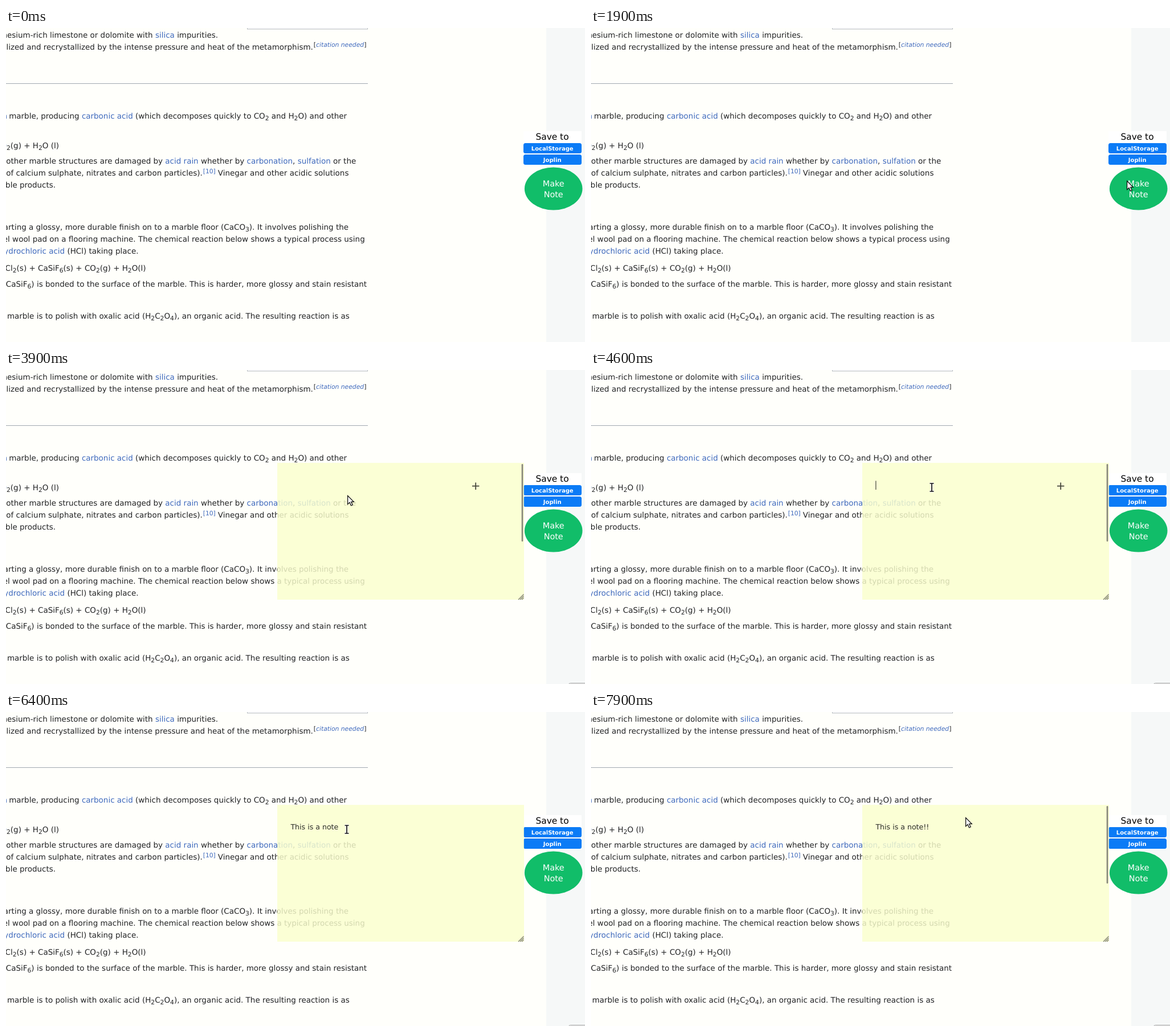
Animation, 1016 px wide and 551 px high, one loop 8000 ms. Source, as an HTML page:

```html
<!DOCTYPE html>
<html lang="en">
<head>
<meta charset="utf-8">
<title>Make a note</title>
<style>
  html, body { margin: 0; width: 100%; height: 100%; overflow: hidden; background: #fffffb; }
  svg { display: block; font-family: "DejaVu Sans", sans-serif; text-rendering: geometricPrecision; }
  text { white-space: pre; }
  #page { font-size: 13.48px; fill: #222325; }
  .small { font-size: 10.78px; }
  .link { fill: #3e69bd; }
  .center { text-anchor: middle; }
  .button { font-size: 10px; font-weight: bold; fill: #fff; }
  .round { font-size: 14.4px; fill: #fff; }
</style>
</head>
<body>
<svg width="1016" height="551" viewBox="0 0 1016 551">
  <rect width="1016" height="551" fill="#fffffb"/>
  <rect x="948" width="68" height="551" fill="#f6f8f8"/>
  <rect x="423.5" y="-10" width="211" height="12" fill="#f8f9fa" stroke="#b9bdc2"/>
  <path d="M0 97.5H635" stroke="#a2a9b1"/>
  <g id="page"></g>

  <rect x="908" y="181" width="102" height="60" fill="#fff"/>
  <text class="center" x="958.5" y="195.7" font-size="15.4">Save to</text>
  <g fill="#0b7bf6">
    <rect x="908" y="202" width="102" height="18" rx="3.5"/>
    <rect x="908" y="222" width="102" height="18" rx="3.5"/>
  </g>
  <text class="center button" x="958.7" y="215">LocalStorage</text>
  <text class="center button" x="958.7" y="234.7">Joplin</text>
  <ellipse cx="960.7" cy="282" rx="50.8" ry="37.5" fill="#11bd69"/>
  <text class="center round" x="960.7" y="278">Make</text>
  <text class="center round" x="960.7" y="296.6">Note</text>

  <g id="note">
    <rect x="987.5" y="549.5" width="40" height="12" rx="3" fill="#f1f1f1" stroke="#a3a3a3"/>
    <g id="sheet">
      <rect x="476" y="163" width="433" height="240" fill="#fbffce" fill-opacity=".82"/>
      <path d="M899 403L908.5 393.5M902 403L908.5 396.5M905 403L908.5 399.5" stroke="#77776a" stroke-width="1.1" fill="none"/>
      <rect id="bar" x="904.7" y="165" width="2.6" rx="1.2" fill="#86857a"/>
    </g>
    <g id="spinner" fill="none" stroke-width="2">
      <circle cx="667.5" cy="299" r="13.5" stroke="#e6e8cc"/>
      <path d="M667.5 285.5a13.5 13.5 0 0 1 13.5 13.5" stroke="#f8fad9"/>
    </g>
    <path id="plus" d="M818 203.7h12.4M824.2 197.5v12.4" stroke="#45463c" stroke-width="1.8"/>
    <text id="typed" x="499.4" y="206" font-size="12.6" fill="#2c2d28"></text>
    <rect id="caret" y="194.5" width="1" height="15.5" fill="#222"/>
  </g>

  <path id="arrow" d="M.6 .6V15.6L4 12.4 6.6 18 9.2 16.8 6.7 11.4H11.2Z" fill="#fff" stroke="#111" stroke-width="1.3"/>
  <g id="beam" fill="none">
    <path d="M-3.5 -7H3.5M0 -7V7M-3.5 7H3.5" stroke="#fff" stroke-width="3.4"/>
    <path d="M-3.5 -7H3.5M0 -7V7M-3.5 7H3.5" stroke="#111" stroke-width="1.7"/>
  </g>
</svg>
<script>
const $ = id => document.getElementById(id);

// Each entry: x, baseline, markup. [..] is a link, _n a subscript.
const lines = [
  [-6.6, 17, 'nesium-rich limestone or dolomite with [silica] impurities.'],
  [0.5, 38, 'lized and recrystallized by the intense pressure and heat of the metamorphism.'],
  [-6.5, 159, '[n]'],
  [5.2, 159, 'marble, producing [carbonic acid] (which decomposes quickly to CO_2 and H_2O) and other'],
  [-9.6, 211, '[O]_2(g) + H_2O (l)'],
  [0.3, 238, 'other marble structures are damaged by [acid rain] whether by [carbonation], [sulfation] or the'],
  [0.3, 259, 'of calcium sulphate, nitrates and carbon particles).'],
  [371.8, 259, 'Vinegar and other acidic solutions'],
  [-0.9, 280, 'ble products.'],
  [-4.2, 354, 'arting a glossy, more durable finish on to a marble floor (CaCO_3). It involves polishing the'],
  [-5.2, 375, 'el wool pad on a flooring machine. The chemical reaction below shows a typical process using'],
  [-3.7, 396, '[ydrochloric acid] (HCl) taking place.'],
  [-1.4, 426, 'Cl_2(s) + CaSiF_6(s) + CO_2(g) + H_2O(l)'],
  [-0.2, 454.3, 'CaSiF_6) is bonded to the surface of the marble. This is harder, more glossy and stain resistant'],
  [1.9, 510, 'marble is to polish with oxalic acid (H_2C_2O_4), an organic acid. The resulting reaction is as']
];

const format = s => s
  .replace(/\[(.+?)\]/g, '<tspan class="link">$1</tspan>')
  .replace(/_(\d)/g, '<tspan class="small" baseline-shift="-3">$1</tspan>');

$('page').innerHTML = lines.map(([x, y, s]) => `<text x="${x}" y="${y}">${format(s)}</text>`).join('') +
  '<text class="small" x="539.8" y="33.2">[<tspan class="link" font-style="italic">citation needed</tspan>]</text>' +
  '<text class="small link" x="345.7" y="254.6">[10]</text>';

// Pointer stops: time, x, y
const pointerPath = [
  [900, 582, 8], [1200, 775, 165], [1500, 915, 306], [1600, 917, 301], [1700, 917, 301],
  [1800, 955, 286], [1900, 940, 268], [3200, 940, 268], [3500, 800, 236], [3800, 610, 221],
  [3900, 599, 220], [4200, 599, 207], [4500, 599, 207], [4600, 598, 206],
  [7500, 598, 206], [7700, 628, 196], [7900, 657, 185]
];

// Typing: time, characters present
const phrase = 'This is a note!!';
const keys = [
  [5000, 1], [5200, 2], [5300, 3], [5400, 4], [5500, 6], [5600, 7], [5800, 8], [5900, 9], [6000, 10],
  [6100, 11], [6200, 12], [6300, 13], [6400, 14], [6700, 15], [6900, 16]
];

const clamp = v => Math.max(0, Math.min(1, v));
const within = (t, a, b) => t >= a && t < b;
const show = (id, on) => $(id).style.display = on ? '' : 'none';
const place = (id, x, y) => $(id).setAttribute('transform', `translate(${x} ${y})`);

function pointerAt(t) {
  const i = pointerPath.findIndex(p => p[0] > t);
  if (i < 0) return pointerPath[pointerPath.length - 1].slice(1);
  if (i === 0) return [0, 0];
  const [t0, x0, y0] = pointerPath[i - 1], [t1, x1, y1] = pointerPath[i];
  const k = (t - t0) / (t1 - t0);
  return [x0 + (x1 - x0) * k, y0 + (y1 - y0) * k];
}

function render(t) {
  const loading = t < 3400;
  show('note', t >= 3100);
  place('sheet', loading ? -1 : 0, loading ? 1 : 0);
  show('spinner', loading);
  $('spinner').setAttribute('transform', `rotate(${(t - 3100) * 0.36} 667.5 299)`);
  show('plus', within(t, 3500, 5200));

  $('bar').setAttribute('height', loading ? 196 : 136);
  $('bar').style.opacity = t < 7000 ? clamp((6000 - t) / 700) : clamp((t - 7500) / 200);

  const count = keys.reduce((n, [at, chars]) => t >= at ? chars : n, 0);
  const typed = $('typed');
  typed.textContent = phrase.slice(0, count);
  show('caret', within(t, 4400, 6400) || within(t, 6900, 7600));
  $('caret').setAttribute('x', 499.4 + (count ? typed.getComputedTextLength() : 0));

  const [x, y] = pointerAt(t);
  const editing = within(t, 4200, 7700);
  show('arrow', t >= 900 && !editing);
  show('beam', editing);
  place('arrow', x, y);
  place('beam', x, y);
}

function tick(now) {
  render(Math.floor(now % 8000 / 100) * 100);
  requestAnimationFrame(tick);
}
render(0);
requestAnimationFrame(tick);
</script>
</body>
</html>
```
